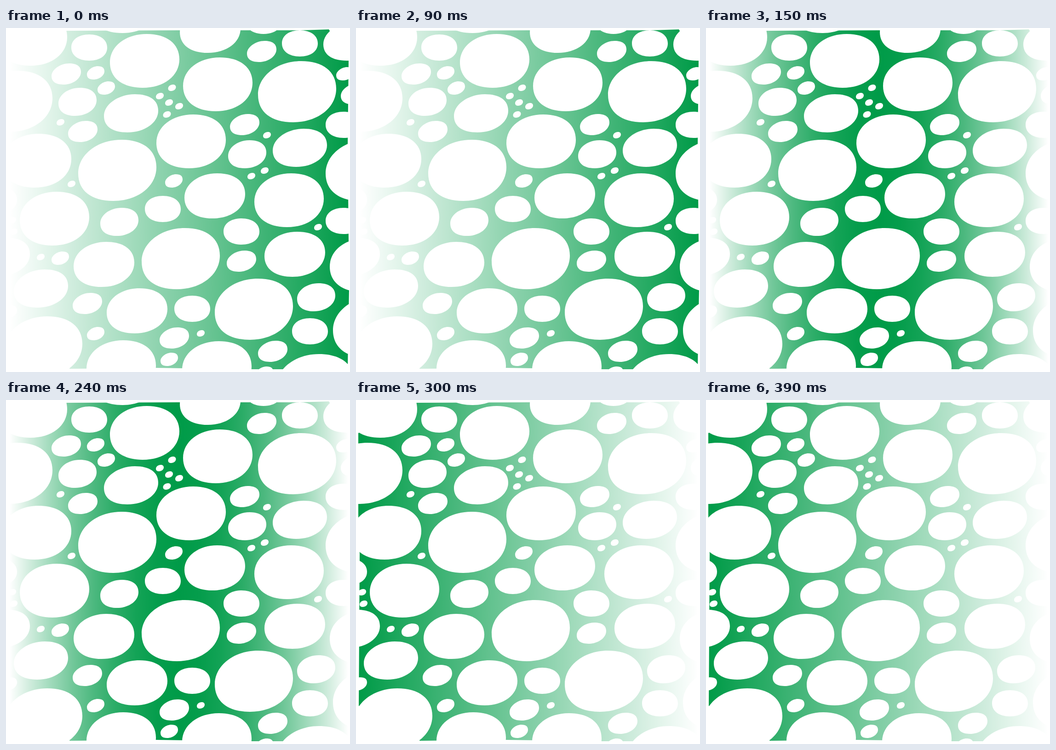
Animation, 748 px wide and 748 px high, one loop 450 ms. Source, as an HTML page:

```html
<!DOCTYPE html>
<html lang="en">
<head>
<meta charset="utf-8">
<title>Green cells</title>
<style>
  html, body { margin: 0; width: 100%; height: 100%; overflow: hidden; background: #fff; }
  svg { display: block; width: 100%; height: 100%; }
</style>
</head>
<body>
<svg viewBox="0 0 748 748">
  <defs>
    <linearGradient id="sweep" gradientUnits="userSpaceOnUse" x1="8" y1="0" x2="744" y2="0"/>
  </defs>
  <path fill="url(#sweep)" d="M132 6L378 5L640 5L702 3L745 70L743 250L746 568L743 733L604 742L534 742L327 739L139 741L6 665L8 335L5 250L5 72Z"/>
  <path id="cells" fill="#fff"/>
</svg>
<script>
const STEP = 150;
const STOPS = 16;
const GREEN = [0, 155, 72];

// Share of green across the stage, one rule per phase.
const PHASES = [u => u, u => Math.sin(Math.PI * u), u => 1 - u];

// One cell outline: a rounded box whose diagonal lean grows with tilt.
function cell(w, h, tilt, x, y) {
  const far = .5 + tilt, near = .5 - tilt;
  const tl = .6 - .9 * tilt, br = .6 - .6 * tilt, full = .6 + .5 * tilt;
  const pt = (u, v) => `${(x + u * w).toFixed(2)} ${(y + v * h).toFixed(2)}`;
  return `M${pt(far, 0)}` +
    `C${pt(far + near * full, 0)} ${pt(1, near * (1 - full))} ${pt(1, near)}` +
    `C${pt(1, near + far * br)} ${pt(near + far * br, 1)} ${pt(near, 1)}` +
    `C${pt(near * (1 - full), 1)} ${pt(0, far + near * full)} ${pt(0, far)}` +
    `C${pt(0, far * (1 - tl))} ${pt(far * (1 - tl), 0)} ${pt(far, 0)}Z`;
}

const cells = (w, h, tilt, ...spots) =>
  spots.map(([x, y]) => cell(w, h, tilt, x, y)).join('');

// Four pebbles on a leaning ring around a fifth.
const cluster = [[346, 155]];
for (let i = 0; i < 4; i++) {
  const c = Math.cos(i * Math.PI / 2), s = Math.sin(i * Math.PI / 2);
  cluster.push([347 + 21 * c + 5.5 * s, 152 + 11 * c - 29 * s]);
}

document.getElementById('cells').setAttribute('d', [
  cells(170, 133, .05, [548, 72], [157, 243], [295, 435], [454, 545], [-69, 93],
    [-4, 627], [695, 243], [711, 584], [587, 709]),
  cells(151, 117, .03, [226, 13], [385, 64], [327, 188], [540, 316], [30, 356],
    [175, 679], [383, 681], [-18, -35], [-9, 230], [704, 457], [182, -106]),
  cells(132, 98, .04, [388, 316], [562, 443], [147, 465], [219, 566], [378, -44]),
  cells(118, 83, .07, [213, 144], [580, 219], [17, 525], [690, -12], [-66, 456]),
  cells(83, 61, .06, [114, 130], [483, 244], [205, 391], [633, 555]),
  cells(78, 57, 0, [142, 14], [600, 5], [302, 365], [473, 414], [366, 582],
    [622, 631], [695, 182], [695, 391], [-54, 345], [521, -44]),
  cells(64, 46, .1, [99, 77], [524, 28], [135, 202], [487, 187], [480, 484],
    [145, 576], [334, 651], [548, 680], [728, 120]),
  cells(38, 29, .12, [176, 83], [199, 116], [346, 318], [99, 486], [176, 650],
    [336, 706], [718, 85], [-14, 603], [543, 736]),
  cells(17, 14, .1, ...cluster, [110, 198], [134, 332], [559, 226], [554, 303],
    [525, 315], [670, 426], [67, 491], [415, 657], [5, 411], [8, 436])
].join(''));

const sweep = document.getElementById('sweep');
const stops = Array.from({ length: STOPS + 1 }, (_, i) => {
  const stop = document.createElementNS('http://www.w3.org/2000/svg', 'stop');
  stop.setAttribute('offset', i / STOPS);
  return sweep.appendChild(stop);
});

const tint = share => `rgb(${GREEN.map(c => Math.round(255 + (c - 255) * share))})`;

function render(time) {
  const level = PHASES[Math.floor(time / STEP) % PHASES.length];
  stops.forEach((stop, i) => stop.setAttribute('stop-color', tint(level(i / STOPS))));
}

function tick() {
  render(performance.now());
  requestAnimationFrame(tick);
}
tick();
</script>
</body>
</html>
```
